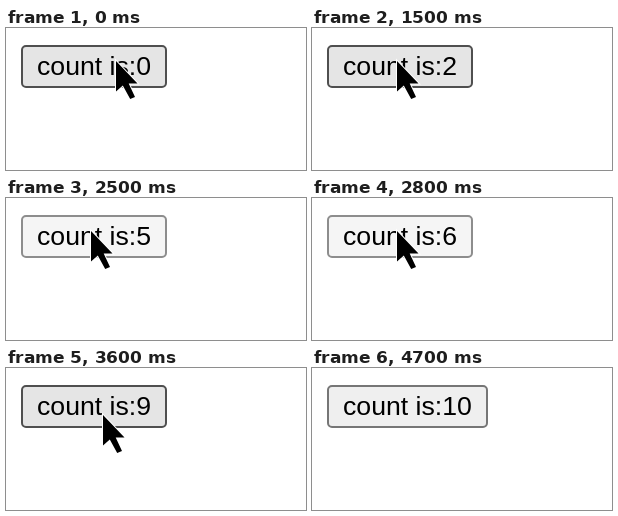
Recreate the animation shown at these times as an HTML page. Size 300 px wide and 142 px high, loop 5.1 s.

```html
<!DOCTYPE html>
<html lang="en">
<head>
<meta charset="utf-8">
<title>Counter button</title>
<style>
html, body { margin: 0; width: 100%; height: 100%; overflow: hidden; background: #fff; }
#button {
  position: absolute; left: 15px; top: 17px; height: 43px;
  box-sizing: border-box; padding: 0 14px;
  border: 2px solid; border-radius: 5px;
  font: 26.667px/38px "Liberation Sans", Arial, sans-serif;
  color: #000; white-space: pre;
}
.idle { background: #efefef; border-color: #767676 !important; }
.hover { background: #e5e5e5; border-color: #4f4f4f !important; }
.active { background: #f5f5f5; border-color: #8d8d8d !important; }
#cursor { position: absolute; left: 0; top: 0; overflow: visible; }
</style>
</head>
<body>
<div id="button" class="hover">count is:0</div>
<svg id="cursor" width="24" height="42">
  <path d="M0 0V30.5L6.8 24.6L14.2 38L19 36L12.7 22.6H21.5Z" fill="#000" stroke="#fff" stroke-width="2" paint-order="stroke"/>
</svg>
<script>
const LOOP = 5100;
const button = document.getElementById("button");
const cursor = document.getElementById("cursor");

// Each entry: time in ms, then whatever changes at that time.
const steps = [
  [0, { count: 0, look: "hover", x: 110, y: 33 }],
  [100, { x: 85 }],
  ...[900, 1100, 1600, 1800, 2100, 2500, 2800, 3000].flatMap((t, i) => click(t, i + 1)),
  [3200, { look: "idle", x: 94, y: 62 }],
  [3300, { x: 97, y: 68 }],
  [3400, { look: "hover", y: 47 }],
  ...click(3500, 9),
  ...click(4200, 10),
  [4400, { look: "idle", x: 150, y: 72 }],
  [4500, { x: 254, y: 101 }],
  [4600, { x: 400 }]
];

function click(time, count) {
  return [[time, { look: "active" }], [time + 100, { look: "hover", count }]];
}

function draw() {
  const now = performance.now() % LOOP;
  const state = Object.assign({}, ...steps.filter(([t]) => t <= now).map(([, change]) => change));
  const label = "count is:" + state.count;
  if (button.textContent !== label) button.textContent = label;
  button.className = state.look;
  cursor.style.transform = `translate(${state.x}px, ${state.y}px)`;
  requestAnimationFrame(draw);
}
draw();
</script>
</body>
</html>
```
